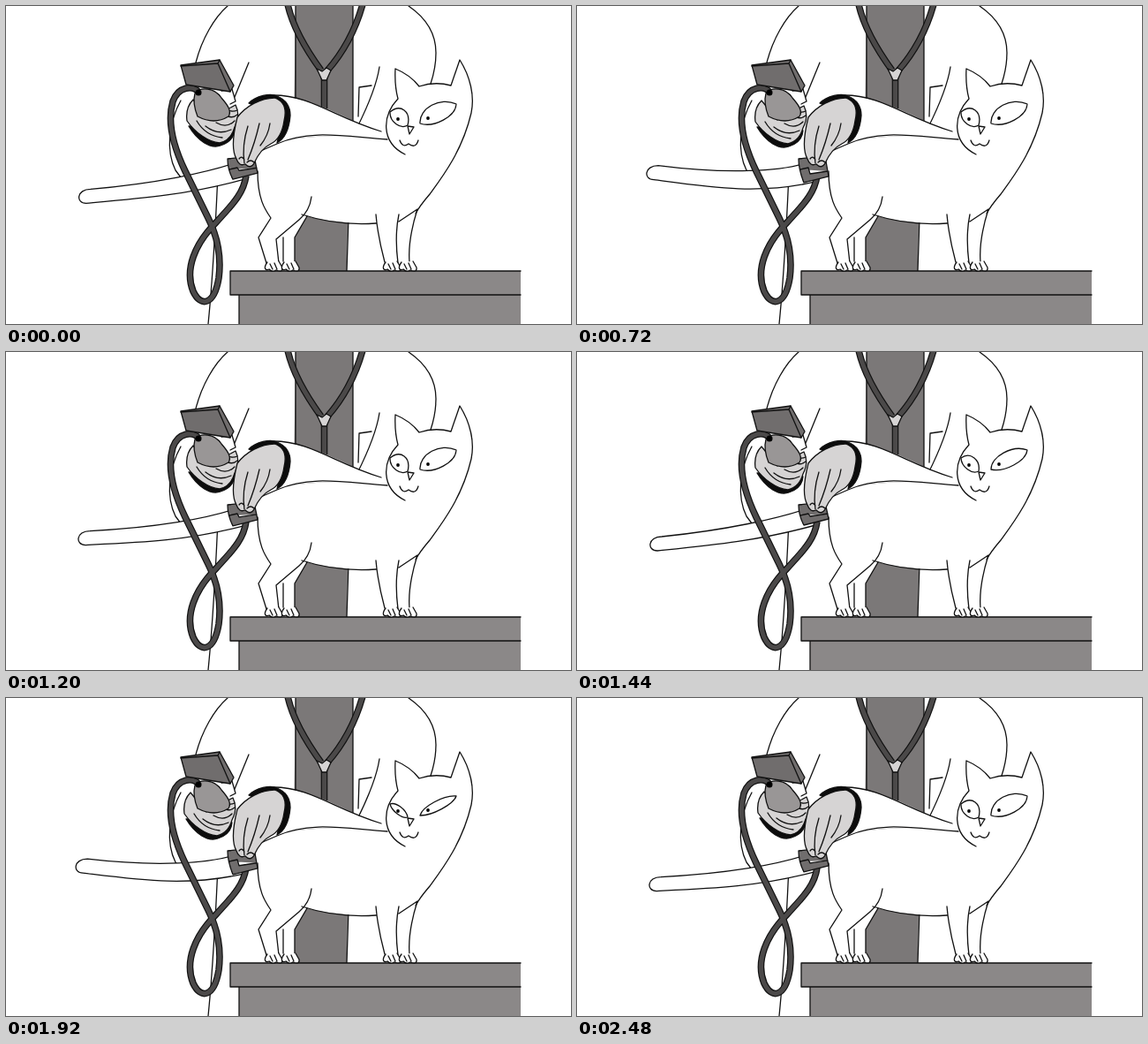
Recreate the animation shown at these times as an HTML page. Size 640x360 px, loop 2.56 s.

```html
<!DOCTYPE html>
<html lang="en">
<head>
<meta charset="utf-8">
<title>Cat at the vet</title>
<style>
  html, body { margin: 0; width: 100%; height: 100%; overflow: hidden; background: #fff; }
  svg { display: block; width: 640px; height: 360px; }
  path { fill: none; stroke: #111; stroke-width: 1.3; stroke-linecap: round; stroke-linejoin: round; }
  .white { fill: #fff; }
  .skin { fill: #d6d4d4; }
  .shirt { fill: #7b7878; }
  .table { fill: #8b8888; }
  .device { fill: #706d6d; }
  .bulb { fill: #999696; }
  .ink { fill: #0c0c0c; }
  .bare { stroke: none; }
  #straps, #hose { stroke: inherit; stroke-width: inherit; stroke-linecap: butt; }
  .rim { stroke: #111; stroke-width: 7.6; }
  .core { stroke: #4b4949; stroke-width: 5.2; }
</style>
</head>
<body>
<svg viewBox="0 0 640 360">
  <defs>
    <path id="straps" d="M319 -2C325 25 341 51 357 73M404 -2C395 30 379 56 364 73M360.5 80V116"/>
    <path id="hose" d="M219 98C212 89 195 91 189 108C182 132 190 160 203 187L229 240C240 262 244 285 241 308C236 338 221 342 212 323C202 298 214 269 238 245C256 225 269 213 272 192"/>
    <path id="paw" class="white" d="M2 -10C-3 -3 0 0 4 -2Q8 2 12 -1Q20 2 19 -4L15 -11M5 -8L8 -2M10 -9L13 -2"/>
  </defs>

  <!-- Vet -->
  <path class="shirt bare" d="M328 0H393V150H389L386 300H326V150Z"/>
  <path d="M328 0V110M393 0V132M388 240L386 300"/>
  <path d="M251 0C236 13 222 37 215 64M275 64L259 103M240 190C238 235 235 300 229 360"/>
  <path d="M456 0C475 13 487 29 487 53Q487 70 481 88M423 69Q419 95 398 137M414 90L400 92L399 125"/>
  <use href="#straps" class="rim"/>
  <use href="#straps" class="core"/>
  <path class="skin" d="M352 71L358 74L363 70L368 73L363 84H358Z"/>

  <!-- Table -->
  <path class="table bare" d="M254 300H583V360H264V327H254Z"/>
  <path d="M583 300H254V327H583M264 327V360"/>

  <!-- Pumping arm -->
  <path d="M198 107C184 132 181 164 192 186L198 194"/>
  <path id="tail" class="white"/>
  <g id="pump">
    <path class="ink" d="M207 136C217 153 232 162 243 158Q258 153 259 140Z"/>
    <path class="skin" d="M212 106Q203 115 205 130C214 143 229 154 242 155Q255 152 259 137Q266 124 260 112L230 128Z"/>
    <path d="M249 116Q255 121 262 118M247 122Q255 129 262 123M238 132Q250 139 259 130M226 136Q240 147 255 140M216 130Q226 147 245 149"/>
  </g>
  <use href="#hose" class="rim"/>
  <use href="#hose" class="core"/>
  <path class="white" d="M244 96L256 94L260 108L254 111"/>
  <path class="bulb" d="M214 99C220 91 236 92 244 104C251 112 256 119 252 125Q236 135 217 125Q211 110 214 99Z"/>
  <path class="device" d="M198 67L242 61L258 90L254 97L204 89Z"/>
  <path d="M198 68L240 65L254 97M240 65L242 61"/>
  <circle cx="218" cy="98" r="3.5"/>

  <!-- Cat body -->
  <path class="white bare" d="M282 166L311 153Q370 142 432 151L527 121C518 165 497 190 472 228L457 292H429L419 246Q370 246 341 238L327 262V292H295L286 262L300 240Q285 220 284 187Z"/>
  <path d="M285 187C285 218 293 230 300 240L286 262L295 291M346 216Q344 232 332 242L306 264L309 291M341 238L327 262V291M314 262V289"/>
  <path d="M335 236Q375 249 419 246M419 236Q421 260 429 290M445 236Q440 260 444 291M445 244L466 230Q455 265 457 290"/>
  <use href="#paw" x="294" y="300"/>
  <use href="#paw" x="313" y="300"/>
  <use href="#paw" x="428" y="300"/>
  <use href="#paw" x="446" y="300"/>

  <!-- Cat head -->
  <path class="white bare" d="M444 105L441 71L468 91H504L514 61L528 110L455 168L430 148Z"/>
  <path d="M452 168C424 154 426 124 444 105Q440 90 441 71Q458 78 468 91Q486 85 504 90L514 61C526 80 531 102 527 121C517 164 494 194 480 213Q468 227 464 235"/>
  <path id="eyes" class="white"/>
  <circle cx="444" cy="128" r="1.9"/>
  <circle cx="478" cy="127" r="1.9"/>
  <path d="M455 136L462 137L457 145ZM446 152Q449 161 456 156Q464 162 467 152"/>

  <!-- Holding arm -->
  <path class="white bare" d="M303 101Q345 101 432 151Q350 142 308 155Z"/>
  <path d="M303 101C345 101 372 126 425 142M432 151C385 148 345 139 307 156L284 166"/>
  <path class="ink" d="M275 110C283 102 299 98 307 102Q322 108 322 124Q320 148 307 155L313 128Z"/>
  <path id="cuff" class="device"/>
  <path class="skin" d="M262 126C272 113 289 104 304 104Q320 109 315 130Q312 150 300 156Q288 162 281 178Q277 185 271 179Q264 182 261 173C255 163 258 142 262 126Z"/>
  <path d="M274 136Q267 158 270 178M287 133Q282 155 274 174M299 133Q297 147 288 158M264 173Q267 169 270 174M273 177Q277 173 281 177"/>
</svg>

<script>
const STEP = 80, LOOP = 2560, SWING = LOOP / 2;
const el = id => document.getElementById(id);
const mix = (a, b, k) => a + (b - a) * k;
const clamp = v => Math.max(0, Math.min(1, v));
const smooth = k => k * k * (3 - 2 * k);

// Leaf shape between two corners, bulging by rise above and sag below.
function almond(ax, ay, bx, by, rise, sag) {
  const dx = bx - ax, dy = by - ay, len = Math.hypot(dx, dy);
  const at = (k, h) => `${ax + dx * k + dy / len * h} ${ay + dy * k - dx / len * h} `;
  return `M${at(0, 0)}C${at(.15, rise)}${at(.75, rise)}${at(1, 0)}C${at(.85, -sag)}${at(.25, -sag)}${at(0, 0)}Z`;
}

function drawTail(up) {
  const x = mix(83, 79, up), y = mix(217, 188.5, up);
  el('tail').setAttribute('d',
    `M270 174C${mix(230, 235, up)} 189 165 ${mix(202, 190, up)} ${x + 13} ${y - 8}` +
    `C${x - 3} ${y - 8} ${x - 4} ${y + 8} ${x + 8} ${y + 8}` +
    `C150 ${mix(219, 205, up)} 205 214 270 ${mix(196, 199, up)}`);

  const low = mix(189, 193, up);
  el('cuff').setAttribute('d',
    `M251 173L281 170L285 ${low}L257 ${low + 7}Q251 185 251 173ZM253 185L262 183L264 ${low - 3}L284 ${low - 6}`);
}

function draw(time) {
  const t = Math.floor(time % LOOP / STEP) * STEP, phase = t % SWING;
  drawTail(smooth((1 - Math.cos((phase - 160) / SWING * 2 * Math.PI)) / 2));

  const squeezing = phase < 160 || phase >= 1120;
  el('pump').setAttribute('transform', squeezing ? '' : 'translate(-3 1)');

  const squint = clamp(2 - Math.abs(t - 1720) / 160);
  el('eyes').setAttribute('d',
    almond(435, 120, 455, 135, mix(15, 3, squint), mix(9, 4, squint)) +
    almond(469, 133, 510, 111, mix(16, 5, squint), mix(12, 5, squint)));
}

function tick() {
  draw(performance.now());
  requestAnimationFrame(tick);
}
tick();
</script>
</body>
</html>
```
